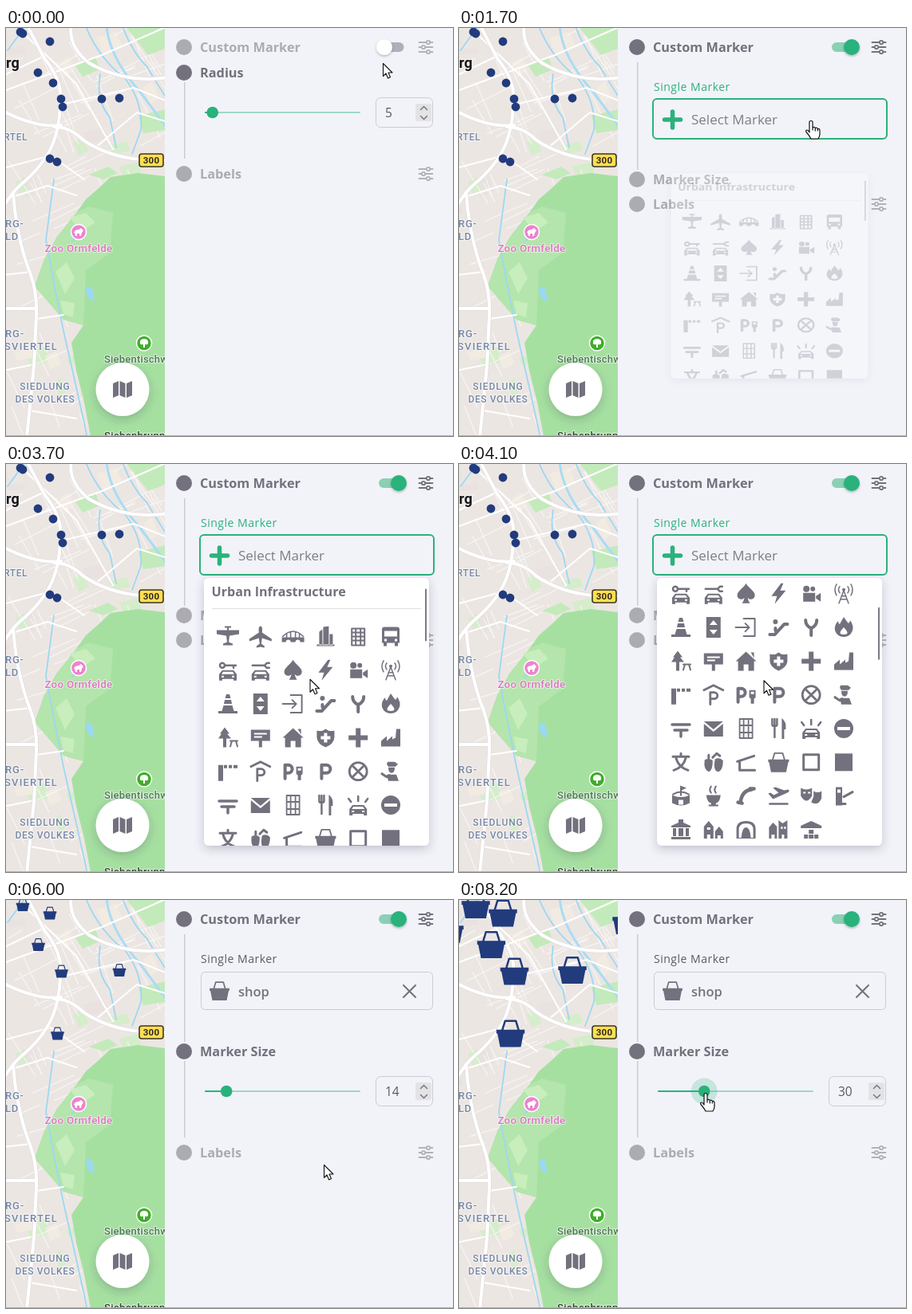
An HTML page that plays this animation: 560x512 px, repeating every 8300 ms.

```html
<!DOCTYPE html>
<html lang="en">
<head>
<meta charset="utf-8">
<title>Custom marker</title>
<style>
html, body { margin: 0; width: 100%; height: 100%; overflow: hidden; background: #f2f3f9; }
svg { display: block; font-family: "Open Sans", sans-serif; }
.map { font-family: Roboto, sans-serif; }
.halo { paint-order: stroke; stroke: #fff; stroke-opacity: .6; stroke-width: 2px; stroke-linejoin: round; }
.line { fill: none; stroke-linecap: round; stroke-linejoin: round; }
</style>
</head>
<body>
<svg id="stage" width="560" height="512" viewBox="0 0 560 512"></svg>
<script>
const LOOP = 8300, STEP = 100;
const DARK = '#73717d', PALE = '#acabb2', INK = '#5b5964', GREEN = '#2ab27b', NAVY = '#213b7d', RULE = '#cbcbd2';

// Each icon: filled path | stroked path | stroke width, centred on 0,0
const car = 'M-7 0H7L11 5V13H7V11H-7V13H-11V5zM-6 2L-8 5H8L6 2zM-8 7h3v2h-3zM5 7h3v2h-3z';
const disc = 'M-12 0a12 12 0 1 0 24 0a12 12 0 1 0-24 0z';
const basket = 'M-13-3.500H13V0H12L9.500 12.500H-9.500L-12 0H-13z|M-7.500-3L-5-11.500H5L7.500-3|1.800';
const icons = [
  'M-4-13h8v2h-3v3h13v5l-12 2-1 8 5 2v2h-12v-2l5-2-1-8-12-2v-5h13v-3h-3z',
  'M0-13q3 0 2 8l12 8v3l-12-4-1 7 4 3v2l-5-1-5 1v-2l4-3-1-7-12 4v-3l12-8q-1-8 2-8z',
  'M-14 1H14V7H9q0-3-3-3t-3 3h-6q0-3-3-3t-3 3h-5z|M-13 0Q0-13 13 0M-8-4V2M-3-6V2M3-6V2M8-4V2|1.600',
  'M-8-6l4-3v20h-4zM-3-12l7-1v24h-7zM5-3h4v14h-4zM-11 10h22v2h-22z',
  '|M-8-10H8V11H-8zM-8-5H8M-8 0H8M-8 5H8M-3-10V11M3-10V11|2',
  'M-8-12h16q3 0 3 3v17h-2v4h-4v-4h-10v4h-4v-4h-2v-17q0-3 3-3zM-8-7v7h16v-7zM-8 3h3v3h-3zM5 3h3v3h-3z',
  car + '|M-4-6H10M7-6v3M-10-6a3 3 0 1 0 6 0a3 3 0 1 0-6 0|2.500',
  car + '|M-10-6H5M11-9H8L5-6L8-3H11|2.500',
  'M0-13C3-7 12-3 11 3C10 8 4 8 2 5Q3 10 5 12H-5Q-3 10-2 5C-4 8-10 8-11 3C-12-3-3-7 0-13z',
  'M3-13L-9 3H-2L-5 13L9-4H2L6-13z',
  'M-10-1H5V10H-10zM6 3L12-1V10L6 6zM-10-6a4 4 0 1 0 8 0a4 4 0 1 0-8 0zM-1-6a3 3 0 1 0 6 0a3 3 0 1 0-6 0z',
  'M-2-5a2 2 0 1 0 4 0a2 2 0 1 0-4 0z|M0-4L-6 12M0-4L6 12M-4 7H4M-3 3H3M-5-9Q-8-5-5-1M5-9Q8-5 5-1M-9-12Q-13-5-9 2M9-12Q13-5 9 2|1.500',
  'M-2-12h4l1.500 5h-7zM-4-5H4L5 0H-5zM-5.500 2H5.500L7.500 9H12V12H-12V9H-7.500z',
  'M-9-13H9V13H-9zM0-9L-5-3H5zM0 9L-5 3H5z',
  '|M-3-11H11V11H-3M-13 0H4M-1-5L4 0L-1 5|2',
  'M-7-7a3 3 0 1 0 6 0a3 3 0 1 0-6 0z|M-11 9H-5L7-4H11M-4 1V4|4',
  '|M-7-9Q-7-2 0 1Q7-2 7-9M0 1V10|4',
  'M0-13Q4-7 6-5Q8-7 8-9Q13-2 11 4Q8 12 0 12Q-8 12-11 4Q-12-3-7-8Q-7-5-5-4Q-3-8 0-13zM0 0Q-9 9 0 9Q9 9 0 0z',
  'M-4-13L2-5H-1L4 1H-2V12H-6V1H-12L-8-5H-10z|M3 4H12M5 4L3 11M10 4L12 11|2',
  'M-12-10h24v14h-10v8h-4v-8h-10zM-8-6h16v2h-16zM-8-2h10v2h-10z',
  'M0-12L13 0H10V12H3V4H-3V12H-10V0H-13zM6-11h4v7z',
  'M-11-9Q-5-7 0-11Q5-7 11-9V0Q10 8 0 12Q-10 8-11 0zM-2-6h4v4h4v4h-4v4h-4v-4h-4v-4h4z',
  'M-3-12H3V-3H12V3H3V12H-3V3H-12V-3H-3z',
  'M-12 11V4L-5-2V4L2-2V2L6 0L7-11H12V11z',
  'M-12-8h6v20h-6zM-5-8h4v4h-4zM1-8h4v4H1zM7-8h5v4H7z',
  '|M-12-6L0-12L12-6M-4 12V-3H1a4 4 0 0 1 0 8H-3|2.800',
  'M4-6h8v9l-2 2v6h-4v-6l-2-2zM6-4v3h4v-3z|M-10 9V-8H-6a5 5 0 0 1 0 10H-9|4',
  '|M-5 9V-8H1a5 5 0 0 1 0 10H-4|4',
  '|M-11 0a11 11 0 1 0 22 0a11 11 0 1 0-22 0M-6-6L6 6M6-6L-6 6|2.800',
  'M-4-12H5L9-9L6-6H-3L-5-9zM-3-5H5Q5 2 1 2T-3-5zM-5 4H7L10 12H-3z|M-11 3L-5 7L-2 5|3',
  '|M-11-5H11M-8 2H8M0 2V10|3.500',
  'M-12-9H12L0 1zM-12-6L0 4L12-6V10H-12z',
  '|M-8-12H8V12H-8zM-3-12V12M3-12V12M-8-4H8M-8 5H8|1.800',
  'M4-13q6 4 5 14h-2v12h-3z|M-8-12V-5Q-8-3-5-3Q-2-3-2-5V-12M-5-12V11|2.500',
  car + '|M-9-4l-3-4M0-5V-11M9-4l3-4|2.500',
  disc + 'M-8-2h16v4h-16z',
  '|M-10-7H10M0-11V-7M-6-5Q-3 6 9 10M6-5Q3 6-9 10|3',
  'M-11-3Q-5-6-1-2Q-1 11-6 12Q-13 9-11-3zM2-4Q8-7 12-2Q12 10 6 12Q-1 11 2-4z|M-6-5V-9M-1-6L4-11M4-11L8-8|3',
  '|M-11-1L10-8M-8-1V10H11|3',
  basket,
  '|M-9.500-9.500H9.500V9.500H-9.500z|3',
  'M-11-11H11V11H-11z',
  'M-11-1Q0 4 11-1V9Q0 15-11 9zM-3 5v6h6v-6zM-1-13L7-10L1-7V0H-1z|M-10-2Q0-8 10-2|2',
  'M-9-1H9Q8 8 3 9V11H6V13H-6V11H-3V9Q-8 8-9-1z|M-3-4q-3-4 0-8M3-4q-3-4 0-8|2',
  '|M7-8Q-5-7-7 8M5-9H10M-10 8L-5 9|4.500',
  'M-13-3L-10-4L-6-1L0-4L-7-10L-4-11L7-7L12-8Q15-6 11-4L-7 4z|M-11 10H11|2.500',
  'M-13-10Q-6-6 1-10V0Q-6 12-13 0zM-10-5v2h3v-2zM-4-5v2h3v-2zM3-6Q8-3 13-6V3Q9 13 0 8L3 1z',
  'M-10-11h8v23h-8zM-8-8v4h4v-4z|M0 1L11-5M-2 10H2|3',
  'M-12-5L-3-9V-13H3V-9L12-5V-3H-12zM-10-2h4v10h-4zM-3-2h6v10h-6zM6-2h4v10h-4zM-12 9h24v3h-24z',
  'M-12-4L-6-11L0-4V11H-4V6H-8V11H-12zM2 2L7-4L12 2V11H9V7H5V11H2zM-8-3v3h4v-3z',
  'M-12 11V-1Q-12-11 0-11Q12-11 12-1V11zM-9 10H-6Q-5-3 0-3Q5-3 6 10H9V0Q9-8 0-8Q-9-8-9 0z',
  'M-12-3L-7-9L-2-4V11H-5V6H-9V11H-12zM0-12L5-8L11-12V11H7V6H4V11H0zM3-4v3h2v-3zM7-4v3h2v-3z',
  'M-13-5L0-11L13-5V-2H-13zM-3 0h6v5h-6zM-9 6h5v5h-5zM-3 6h6v5h-6zM4 6h5v5h-5z'
];

const svgIcon = (def, x, y, color, scale = 1) => {
  const [fill, line, w] = def.split('|');
  return `<g transform="translate(${x} ${y}) scale(${scale})"><path d="${fill}" fill="${color}" fill-rule="evenodd"/>` +
    (line ? `<path class="line" d="${line}" stroke="${color}" stroke-width="${w}"/>` : '') + '</g>';
};
const text = (x, y, str, size, weight, fill, extra = '') =>
  `<text x="${x}" y="${y + size * .355}" font-size="${size}" font-weight="${weight}" fill="${fill}" ${extra}>${str}</text>`;
const line = (d, color, w, extra = '') =>
  `<path class="line" d="${d}" stroke="${color}" stroke-width="${w}" ${extra}/>`;
const rect = (x, y, w, h, r, fill, extra = '') =>
  `<rect x="${x}" y="${y}" width="${w}" height="${h}" rx="${r}" fill="${fill}" ${extra}/>`;
const dot = (x, y, r, fill, extra = '') => `<circle cx="${x}" cy="${y}" r="${r}" fill="${fill}" ${extra}/>`;

let seed = 11;
const rnd = () => (seed = (seed * 16807) % 2147483647) / 2147483647;

function streets() {
  let blocks = '', roads = '';
  for (let i = 0; i < 34; i++) {
    const x = rnd() * 200 - 10, y = rnd() * 510, w = 8 + rnd() * 18, h = 6 + rnd() * 16;
    blocks += `<path d="M${x} ${y}l${w} ${-h * .4}l${h * .4} ${h}l${-w} ${h * .4}z" fill="${['#e9e2e1', '#f1ebe2', '#d6edcc'][i % 3]}"/>`;
  }
  for (let i = 0; i < 110; i++) {
    const a = (rnd() < .5 ? -.42 : 1.12) + (rnd() - .5) * .3, len = 18 + rnd() * 50;
    roads += `M${rnd() * 200} ${rnd() * 512}l${Math.cos(a) * len} ${Math.sin(a) * len}`;
  }
  return blocks + line(roads, '#fff', 1.2, 'opacity=".6"');
}

const placeName = (x, y, s, size, sp, extra = '') =>
  text(x, y, s, size, 500, '#7587a6', `class="halo" letter-spacing="${sp}" ${extra}`);

function baseMap() {
  const mid = 'text-anchor="middle"';
  const main = 'M-4 226Q6 208 18 197Q46 174 58 147Q67 126 68 96Q72 68 48 38L26-4M60 124Q80 124 96 140Q126 161 168 165L202 166M-4 104Q38 126 69 122M82-4Q77 22 104 44Q150 70 202 62M9 206Q13 264 31 310Q39 332 38 360L35 424L26 514M-4 352H38';
  const minor = 'M0 78L62 55L120 34L202-2M20 5L88 70L134 152M48 35L-4 60M70 96L160 75L202 92M112 150L164 106L202 118M-4 176L56 160L98 190M8 212L52 198L88 210M-4 310L32 306M38 365L72 360M30 480L88 490M-4 430L36 422';
  return rect(0, 0, 200, 512, 0, '#ece6e3') + streets() +
    '<path d="M150-2L199-2V26L178 34zM86 46l26-10 6 16-22 9zM166 110l34-8v26l-28 4zM104 184l24-10 12 8-18 8z" fill="#c3eabb"/>' +
    '<path d="M88 232L100 215L115 202L131 187L165 182L200 186V512H106L98 470L88 430L82 395L97 373L72 366L36 324L48 290L64 262z" fill="#a6e0a1"/>' +
    '<path d="M64 262L88 232L104 224L134 232L130 282L100 304L97 373L72 366L36 324L48 290z" fill="#b4e5ac"/>' +
    '<path d="M62 306l14-12 10 20-12 20zM68 342l18 3-2 18-12-4zM80 238l20-6 12 12-18 12z" fill="#c8eebd"/>' +
    line('M100-2Q116 38 148 62Q172 92 169 128L158 158M146-2Q158 30 176 48L202 90M118 58Q112 90 130 112L138 150M24-2L2 28M60 190L50 266L60 320L72 380L86 442L102 514', '#9dd8f2', 1.8) +
    line('M126-2Q130 38 168 80L202 126', '#a9dcf4', 3) +
    '<path d="M100 325q8-2 9 6t2 12q-8-1-10-9zM86 252l12 2-4 9-12 5z" fill="#9bd9f3"/>' +
    line(minor, '#fff', 2) + line(main, '#ded8d9', 5.2) + line(main, '#fff', 4) +
    '<g id="hiddenNames">' + text(0, 44, 'rg', 18, 700, '#17171a', 'class="halo"') + placeName(-3, 137, 'RTEL', 12, .6) + '</g>' +
    placeName(-1, 245, 'RG-', 13, .8) + placeName(-1, 261, 'LD', 13, .8) +
    placeName(-1, 383, 'RG-', 13, 1) + placeName(-2, 399, 'SVIERTEL', 13, 1.2) +
    placeName(49, 450, 'SIEDLUNG', 12, .9, mid) + placeName(49, 465.5, 'DES VOLKES', 12, .6, mid) +
    dot(91, 256, 9.5, '#ee82cf', 'stroke="#fff" stroke-width="1.5"') +
    '<path d="M85 257q1-4 6-4l3-2 3 3-2 3-1 4h-2v-3h-3v3h-2l-1-4z" fill="#fff"/>' +
    text(91, 276, 'Zoo Ormfelde', 13.3, 500, '#e46fc6', 'class="halo" letter-spacing=".3" ' + mid) +
    dot(173, 395.5, 9.5, '#3fae2a', 'stroke="#fff" stroke-width="1.5"') +
    '<path d="M168 396q-1-6 5-6t5 6q-1 2-4 1v4h-2v-4q-3 1-4-1z" fill="#fff"/>' +
    text(123, 415.500, 'Siebentischwald', 13, 500, '#527a58', 'class="halo" letter-spacing=".2"') +
    text(123, 511, 'Siebenbrunn', 13, 500, '#3b3b40', 'class="halo" letter-spacing=".3"') +
    rect(167, 158, 30, 16, 3, '#ffdf4f', 'stroke="#3a3626" stroke-width="1.6"') +
    text(182, 166, '300', 11.5, 700, '#2c2a20', 'letter-spacing=".3" ' + mid);
}

const tune = (y, id) => `<g id="${id}" transform="translate(526 ${y})" stroke="${DARK}" fill="#f2f3f9" stroke-width="1.8" stroke-linecap="round">
  <path d="M-8.500-6H8.500M-8.500 0H8.500M-8.500 6H8.500"/><circle cx="3" cy="-6" r="2.200"/><circle cx="-3" cy="0" r="2.200"/><circle cx="3" cy="6" r="2.200"/></g>`;

function rowHead(id, label) {
  return `<g id="${id}">${dot(223, 0, 10, 'currentColor')}` +
    text(243, 0, label, 16.3, 700, 'currentColor', `id="${id}Text"`) + '</g>';
}

function dropdown() {
  let cells = '';
  icons.forEach((def, i) => {
    cells += svgIcon(def, 278 + i % 6 * 40.8, 222.5 + Math.floor(i / 6) * 42.3, DARK);
  });
  return `<g id="drop">${rect(248, 143, 282, 336, 6, '#fff', 'filter="url(#shadow)"')}
    <g clip-path="url(#dropClip)"><g id="scroll">${text(257.5, 166, 'Urban Infrastructure', 16.1, 700, DARK)}
    ${rect(258, 187, 262, 1, 0, '#dedee3')}${cells}
    ${text(257.5, 605, 'Recreation and Entertainment', 16.1, 700, DARK)}</g></g>
    ${rect(525, 155, 2, 66, 1, '#7b7984', 'id="bar"')}</g>`;
}

const clip = (id, y) => `<clipPath id="${id}"><rect id="${id}Box" x="200" y="${y}" width="360" height="0"/></clipPath>`;

stage.innerHTML = `<defs>
  <filter id="shadow" x="-20%" y="-20%" width="140%" height="150%"><feDropShadow dx="0" dy="4" stdDeviation="6" flood-color="#30304a" flood-opacity=".25"/></filter>
  <filter id="soft" x="-40%" y="-40%" width="180%" height="190%"><feDropShadow dx="0" dy="1.500" stdDeviation="1.500" flood-opacity=".28"/></filter>
  <clipPath id="mapClip"><rect width="199" height="512"/></clipPath>
  <clipPath id="dropClip"><rect x="248" y="143" width="282" height="336" rx="6"/></clipPath>
  ${clip('clipA', 40)}${clip('clipB', 12)}</defs>
  <g class="map" clip-path="url(#mapClip)">${baseMap()}<g id="marks"></g>
    ${dot(146, 453.5, 33.5, '#fff', 'filter="url(#shadow)"')}
    <path d="M134 446l7-3v18l-7 3zM142.500 443l7 3v18l-7-3zM151 446l7-3v18l-7 3z" fill="${DARK}"/></g>
  ${rect(199, 0, 361, 512, 0, '#f2f3f9')}
  <g id="rowA" transform="translate(0 24)">${rowHead('headA', 'Custom Marker')}</g>
  ${rect(467, 18, 33, 12, 6, '#b0aeb6', 'id="track"')}${dot(0, 24, 10, '#fff', 'id="knob" filter="url(#soft)"')}
  ${tune(24, 'tuneA')}
  <g clip-path="url(#clipA)"><g id="bodyA">${rect(223, 43, 1.5, 135, 0, RULE)}
    ${text(244, 74, 'Single Marker', 14, 400, INK, 'id="caption" letter-spacing=".5"')}
    ${rect(244, 90, 291, 48, 5, 'none', 'id="field"')}
    <g id="empty">${line('M257.500 115H277.500M267.500 105V125', GREEN, 5.5)}${text(291, 115, 'Select Marker', 17, 400, '#7f7d88')}</g>
    <g id="chosen">${svgIcon(basket, 267.5, 114, DARK, .95)}${text(291, 115, 'shop', 16.5, 600, DARK)}
      ${line('M498 107L513 122M513 107L498 122', DARK, 2)}</g></g></g>
  <g id="rowB">${rowHead('headB', 'Radius')}
    <g clip-path="url(#clipB)"><g id="bodyB">${rect(223, 12, 1.5, 96, 0, RULE)}
      ${rect(249, 49, 195, 2, 1, '#a1d7c6')}${rect(249, 49, 0, 2, 1, GREEN, 'id="level"')}
      ${dot(0, 50, 16.5, GREEN, 'id="glow" fill-opacity=".22"')}${dot(0, 50, 7.3, GREEN, 'id="thumb"')}
      ${rect(463.5, 31.5, 71, 37, 6, 'none', `stroke="${RULE}"`)}
      ${text(475, 50, '5', 15.5, 400, INK, 'id="number"')}
      ${rect(513, 39, 20, 22, 2, '#e3e3e6')}${line('M519.500 46.500L523.500 42.500L527.500 46.500M519.500 54.500L523.500 58.500L527.500 54.500', '#77757f', 1.5)}
    </g></g></g>
  <g id="rowC">${rowHead('headC', 'Labels')}${tune(0, 'tuneC')}</g>
  ${dropdown()}
  ${rect(0, 511, 560, 1, 0, '#a9b7bd')}
  <g id="cursor" stroke-linejoin="round" stroke-linecap="round">
    <path id="arrow" d="M.500 .500V16.500L4 13L6.500 19L9.500 17.700L7 12H12z" fill="#fff" stroke="#111" stroke-width="1.100"/>
    <path id="hand" d="M-2 1.500Q-2-.500 0-.500T2 1.500V8Q4 6.500 5.300 8.500Q7.300 7.500 8.300 9.500Q11 8.800 11 12V16Q11 19 9 22H0Q-2 18-6 13.500Q-7 11-5 11Q-3.500 11-2 14zM2 8V11M5.300 9V12M8.300 10V12" fill="#fff" stroke="#111" stroke-width="1.200"/>
    <path id="beam" class="line" d="M-3-8Q0-8 0-6Q0-8 3-8M0-6V6M-3 8Q0 8 0 6Q0 8 3 8" stroke="#111" stroke-width="1.400"/>
  </g>`;

const $ = id => document.getElementById(id);
const set = (id, attrs) => { for (const k in attrs) $(id).setAttribute(k, attrs[k]); };
const ease = (t, a, b) => {
  const p = Math.min(1, Math.max(0, (t - a) / (b - a)));
  return p * p * (3 - 2 * p);
};
const track = (keys, t, col = 1) => {
  let i = 0;
  while (i < keys.length - 2 && t >= keys[i + 1][0]) i++;
  const a = keys[i], b = keys[i + 1];
  return a[col] + (b[col] - a[col]) * Math.min(1, Math.max(0, (t - a[0]) / (b[0] - a[0])));
};

const pointer = [
  [0, 472, 44, 'arrow'], [300, 482, 26, 'hand'], [700, 482, 26, 'arrow'], [1200, 448, 96, 'hand'],
  [1400, 441, 117, 'hand'], [2000, 441, 117, 'hand'], [2300, 420, 146, 'arrow'], [2600, 388, 186, 'beam'],
  [2900, 388, 186, 'beam'], [3200, 380, 250, 'arrow'], [3500, 380, 269, 'arrow'], [4300, 382, 272, 'arrow'],
  [4700, 395, 320, 'hand'], [5300, 397, 326, 'arrow'], [5600, 398, 332, 'arrow'], [6100, 398, 332, 'arrow'],
  [6700, 278, 243, 'hand'], [7000, 278, 243, 'hand'], [8200, 309, 243, 'hand'], [8300, 309, 243, 'hand']
];
const scrolling = [[3600, 0], [3700, 6], [3900, 54], [4200, 126], [4400, 144]];
const sizes = [[7000, 14], [8200, 30]];
const dots = [[18, 5], [21, 7], [55, 17], [40, 56], [59, 69], [69, 89], [71, 99], [120, 89], [142, 88], [55, 164], [64, 168]];
const shops = [[21, 6], [-12, 37], [55, 16.500], [40.500, 56], [69.500, 89.500], [142, 88], [64.500, 167.500], [210, 26]];

let marksKey = '';
function drawMarks(picked, size) {
  const key = picked ? size : 'dots';
  if (key === marksKey) return;
  marksKey = key;
  $('marks').innerHTML = picked
    ? shops.map(([x, y]) => svgIcon(basket, x, y, NAVY, size / 22)).join('')
    : dots.map(([x, y]) => dot(x, y, 5.4, NAVY)).join('');
  // Place names make room for the larger markers
  set('hiddenNames', { visibility: picked ? 'hidden' : 'visible' });
}

function render(t) {
  const on = t >= 500, picked = t >= 5200, focus = t >= 1500 && !picked;
  const openA = ease(t, 500, 800);
  const openB = 1 - openA + ease(t, 5200, 5500);
  const tone = live => 'color:' + (live ? DARK : PALE);

  set('headA', { style: tone(on) });
  const slide = ease(t, 450, 650);
  set('knob', { cx: 474 + 18 * slide, fill: on ? GREEN : '#fff' });
  set('track', { x: 465.5 + 1.5 * slide, fill: on ? '#8bd0b5' : '#b0aeb6' });
  set('tuneA', { opacity: on ? 1 : .5 });
  set('tuneC', { opacity: .5 });
  set('clipABox', { height: 138 * openA });
  set('bodyA', { opacity: openA });
  set('caption', { fill: focus ? GREEN : INK });
  set('field', focus
    ? { x: 243, y: 89, width: 293, height: 50, stroke: GREEN, 'stroke-width': 2 }
    : { x: 244.5, y: 90.5, width: 290, height: 47, stroke: RULE, 'stroke-width': 1 });
  set('empty', { opacity: picked ? 0 : 1 });
  set('chosen', { opacity: picked ? 1 : 0 });

  const yB = 56 + 134 * openA;
  set('rowB', { transform: `translate(0 ${yB})` });
  set('headB', { style: tone(!on || picked) });
  $('headBText').textContent = on ? 'Marker Size' : 'Radius';
  set('clipBBox', { height: 97 * openB });
  set('bodyB', { opacity: openB });
  set('rowC', { transform: `translate(0 ${yB + 31 + 96 * openB})` });
  set('headC', { style: tone(false) });

  const size = picked ? Math.round(track(sizes, t)) : 5;
  const x = 249 + size * 1.94;
  set('thumb', { cx: x });
  set('glow', { cx: x, opacity: ease(t, 6600, 6800) });
  set('level', { width: x - 249 });
  $('number').textContent = size;
  drawMarks(picked, size);

  const grow = ease(t, 1600, 1800) * (1 - ease(t, 5100, 5300));
  const s = .75 + .25 * grow, top = track(scrolling, t);
  set('drop', { opacity: grow * grow, transform: `translate(389 311) scale(${s} ${s * s}) translate(-389 -311)` });
  set('scroll', { transform: `translate(0 ${-top})` });
  set('bar', { y: 155 + top * .243 });

  let shape = 'arrow';
  for (const k of pointer) if (t >= k[0]) shape = k[3];
  set('cursor', { transform: `translate(${track(pointer, t, 1)} ${track(pointer, t, 2)})` });
  for (const id of ['arrow', 'hand', 'beam']) set(id, { visibility: id === shape ? 'visible' : 'hidden' });
}

const start = performance.now();
function tick() {
  const t = (performance.now() - start) % LOOP;
  render(Math.floor(t / STEP) * STEP);
  requestAnimationFrame(tick);
}
tick();
</script>
</body>
</html>
```
